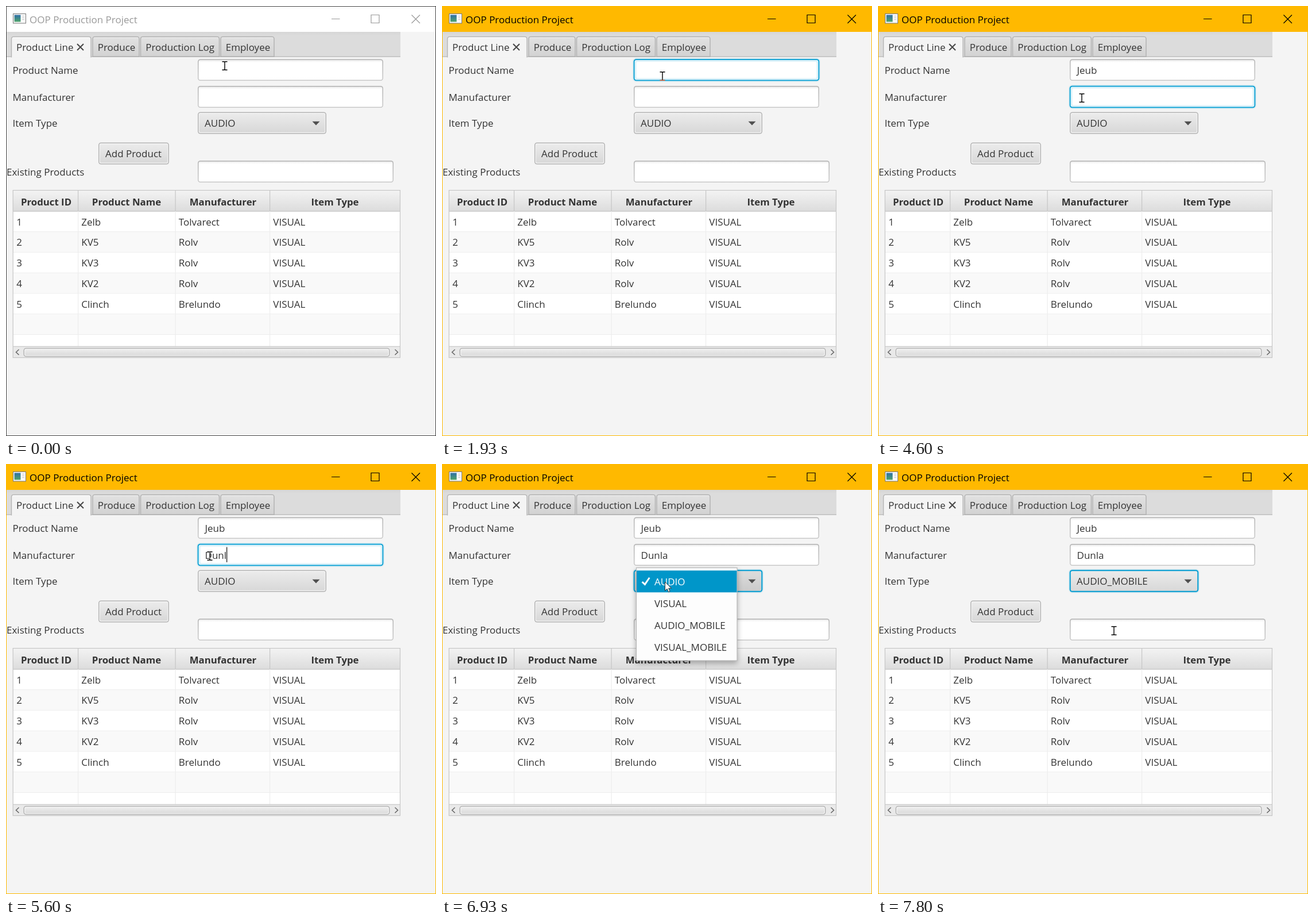
These frames come from a looping animation (749x748 px, 8000 ms). An HTML page:

```html
<!DOCTYPE html>
<html lang="en">
<head>
<meta charset="utf-8">
<title>OOP Production Project</title>
<style>
html, body { margin: 0; width: 100%; height: 100%; overflow: hidden; background: #f4f4f4; }
svg { display: block; width: 100%; height: 100%; }
text { font: 17px "Open Sans", "Noto Sans", sans-serif; fill: #333; white-space: pre; }
.head { font-weight: 700; font-size: 16.8px; text-anchor: middle; }
#beam { mix-blend-mode: difference; }
#popup { filter: drop-shadow(0 4px 5px rgba(0, 0, 0, .3)); }
</style>
</head>
<body>
<svg id="stage" viewBox="0 0 749 748"></svg>
<script>
const LOOP = 8000;
const stage = document.getElementById('stage');
const $ = id => document.getElementById(id);

// Markup helpers
const attrs = o => Object.entries(o).map(([k, v]) => ` ${k}="${v}"`).join('');
const rect = (x, y, w, h, fill, o = {}) =>
  `<rect x="${x}" y="${y}" width="${w}" height="${h}" fill="${fill}"${attrs(o)}/>`;
const path = (d, o) => `<path d="${d}"${attrs({ fill: 'none', ...o })}/>`;
const text = (x, y, s, o = {}) => `<text x="${x}" y="${y}"${attrs(o)}>${s}</text>`;
const group = (id, body) => `<g id="${id}">${body}</g>`;
const grad = (id, ...stops) =>
  `<linearGradient id="${id}" x2="0" y2="1">${stops.map(([at, c]) =>
    `<stop offset="${at}" stop-color="${c}"/>`).join('')}</linearGradient>`;

// A control is a stack of inset rounded rects, as [inset, fill]
const layers = (x, y, w, h, list) => list.map(([i, fill]) =>
  rect(x + i, y + i, w - 2 * i, h - 2 * i, fill, { rx: Math.max(2, 4.5 - i) })).join('');
const FOCUS = '#039ed3', FAINT = '#039ed322';
const plainField = box => layers(...box, [[0, 'url(#edge)'], [1.5, 'url(#inset)']]);
const focusField = box => layers(...box,
  [[-2, FAINT], [-0.3, FOCUS], [1.5, '#fff'], [1.5, FAINT], [4.5, '#fff']]);
const button = (box, fill = 'url(#btn)') => layers(...box, [[0, '#b4b4b4'], [1.5, '#f6f6f6'], [2.7, fill]]);

const NAME = [334, 92.5, 323, 37.5];
const MAKER = [334, 139, 323, 38];
const SEARCH = [334, 269, 341, 38];
const COMBO = [334, 184.5, 224, 38];
const TYPES = ['AUDIO', 'VISUAL', 'AUDIO_MOBILE', 'VISUAL_MOBILE'];
const ITEM_TOP = 185.3, ITEM_H = 38;

function titleBar() {
  return rect(0.5, 0.5, 748, 747, 'none', { id: 'frame' }) + rect(1, 1, 747, 44, '#fff', { id: 'bar' }) +
    rect(12.5, 13.5, 22, 16.5, '#fbfbfb', { stroke: '#777' }) +
    rect(14.5, 15.5, 11, 12, 'url(#icon)') +
    path('M28 17.5h4M28 20.5h4M28 23.5h4', { stroke: '#c4c4c4' }) +
    text(41, 29.7, 'OOP Production Project', { id: 'title' }) +
    path('M567 22.5h14.5M636 15.5h14v14h-14zM706.5 15.5l14.5 14.5M721 15.5l-14.5 14.5',
      { id: 'winBtns', 'stroke-width': 1.2 });
}

function tabs() {
  const tab = (x, w, label) =>
    path(`M${x} 88V57.5q0 -4 4 -4h${w - 8}q4 0 4 4V88z`, { fill: 'url(#tab)', stroke: '#b0b0b0', 'stroke-width': 1.4 }) +
    path(`M${x + 1.5} 55.2h${w - 3}`, { stroke: '#efefef' }) + text(x + 8.7, 77.8, label);
  return rect(1, 45, 686, 43.5, 'url(#tabBar)') + rect(1, 87.5, 686, 1.2, '#b8b8b8') +
    tab(151, 81, 'Produce') + tab(234.5, 137, 'Production Log') + tab(374, 93, 'Employee') +
    path('M9.5 89.5V57.5q0 -4 4 -4h130.500q4 0 4 4V89.500', { fill: '#f4f4f4', stroke: '#b5b5b5', 'stroke-width': 1.4 }) +
    path('M11.500 55.200h134.500', { stroke: '#fff' }) +
    text(18, 77.8, 'Product Line') +
    path('M124 66l11 11M135 66l-11 11', { stroke: '#484848', 'stroke-width': 2.1 });
}

function form() {
  const [cx, cy, cw, ch] = COMBO;
  return text(11.5, 117.5, 'Product Name') + text(11.5, 164.500, 'Manufacturer') +
    text(11.5, 210.3, 'Item Type') + text(1, 294.8, 'Existing Products') +
    [NAME, MAKER, SEARCH].map(plainField).join('') +
    group('nameFocus', focusField(NAME)) + group('makerFocus', focusField(MAKER)) +
    text(346.5, 117.5, '', { id: 'name' }) + text(346.5, 164.5, '', { id: 'maker' }) +
    rect(346.3, 98.3, 1.5, 26.4, '#333', { id: 'caret' }) +
    button(COMBO) +
    group('comboFocus', layers(cx, cy, cw, ch, [[-2, FAINT], [-0.3, FOCUS], [1.7, 'url(#btn)']])) +
    rect(cx + 2, cy + 2, cw - 4, ch - 4, '#00000010', { id: 'comboArmed', rx: 3 }) +
    path('M533.500 200.700h13l-6.500 6.800z', { fill: '#505050' }) +
    text(346, 210.3, '', { id: 'choice' }) +
    button([161, 237.5, 123, 38]) + text(173, 263, 'Add Product');
}

function table() {
  const cols = [12, 125, 294.5, 459];
  const heads = [['Product ID', 70], ['Product Name', 210], ['Manufacturer', 378], ['Item Type', 573]];
  const data = [
    ['Zelb', 'Tolvarect'], ['KV5', 'Rolv'], ['KV3', 'Rolv'], ['KV2', 'Rolv'], ['Clinch', 'Brelundo']
  ];
  let s = rect(12, 320.5, 675, 291.5, '#fff');
  for (let i = 0; i < 7; i++) {
    const y = 357.3 + i * 35.8, h = Math.min(35.8, 592 - y);
    s += rect(12, y, 675, h, i % 2 ? '#f9f9f9' : '#fff');
    if (i < 6) s += rect(12, y + h - 1, 675, 1.2, '#ededed');
  }
  s += rect(12, 321, 675, 36, 'url(#head)') + rect(12, 356.5, 675, 1.2, '#c4c4c4');
  for (const x of cols.slice(1))
    s += rect(x, 357, 1.2, 235, '#ededed') + rect(x, 321, 1.2, 36, '#c6c6c6');
  s += heads.map(([h, x]) => text(x, 346.5, h, { class: 'head' })).join('');
  data.forEach((row, i) => [i + 1, ...row, 'VISUAL'].forEach((v, c) => {
    s += text(cols[c] + 6.3, 381.5 + i * 35.9, v);
  }));
  return s + rect(12, 592, 675, 20, '#e9e9e9') + rect(12, 591.700, 675, 1.200, '#c8c8c8') +
    button([30.5, 594.8, 638, 15.5], 'url(#thumb)') +
    path('M22.500 597.500l-5 4.700 5 4.700M677.500 597.500l5 4.700 -5 4.700', { stroke: '#6a6a6a', 'stroke-width': 1.5 }) +
    rect(12.2, 320.6, 674.3, 291, 'none', { stroke: '#c6c6c6', 'stroke-width': 1.2 });
}

function popup() {
  return group('popup', rect(338.5, 180.5, 175.5, 161.5, '#fdfdfd', { stroke: '#b8b8b8', 'stroke-width': 1.2 }) +
    rect(339, 0, 174.5, ITEM_H, '#0096c9', { id: 'hover' }) +
    path('M347.500 206l2.300 -2 3.200 3.300 7.200 -10.300 2.300 1.500 -8.800 13.300z', { id: 'check' }) +
    TYPES.map((s, i) => text(370, 210.900 + i * ITEM_H, s, { id: 'type' + i })).join(''));
}

stage.innerHTML =
  '<defs>' +
  grad('edge', [0, '#b2b2b2'], [1, '#c8c8c8']) +
  grad('inset', [0, '#ececec'], [.12, '#fff']) +
  grad('btn', [0, '#ebebeb'], [1, '#d8d8d8']) +
  grad('tabBar', [0, '#d6d6d6'], [.15, '#dcdcdc'], [1, '#dcdcdc']) +
  grad('tab', [0, '#e2e2e2'], [1, '#d2d2d2']) +
  grad('head', [0, '#f3f3f3'], [1, '#dcdcdc']) +
  grad('thumb', [0, '#ededed'], [1, '#dadada']) +
  grad('icon', [0, '#2f6fa8'], [1, '#4fa36b']) +
  '</defs>' +
  rect(0, 0, 749, 748, '#f4f4f4') + titleBar() + tabs() + form() + table() + popup() +
  path('M-4.500 -7.300h3.500l1 1 1 -1h3.500M0 -6.500v13M-4.500 7.300h3.500l1 -1 1 1h3.500',
    { id: 'beam', stroke: '#fff', 'stroke-width': 1.4 }) +
  path('M.5 .5v15.500l3.600 -3.400 2.400 5.500 2.500 -1.100 -2.400 -5.300h4.900z',
    { id: 'arrow', fill: '#fff', stroke: '#333' });

// Timeline
const POINTER = [
  [0, 381, 104], [130, 384, 122], [3800, 384, 122], [4070, 362, 150], [4330, 355, 160],
  [6200, 355, 160], [6600, 388, 204.5], [7270, 388, 204.5], [7400, 404, 261], [7670, 411, 290]
];
const BLINKS = [400, 930, 1400, 1930, 2270, 3870, 4130, 4600, 4670, 6270];
const NAME_KEYS = [2600, 2930, 3130, 3330];
const MAKER_KEYS = [5000, 5330, 5400, 5600, 5800];

const passed = (times, t) => times.filter(at => t >= at).length;
// The screen refreshes 15 times a second, on 10 ms stamps
const tick = t => Math.round(Math.floor((t + 4) * 0.015) * 100 / 15) * 10;
const mix = (a, b, k) => `rgb(${a.map((v, i) => Math.round(v + (b[i] - v) * k))})`;
const show = (id, on) => $(id).setAttribute('display', on ? 'inline' : 'none');
const set = (id, o) => { for (const k in o) $(id).setAttribute(k, o[k]); };

function pointerAt(t) {
  const i = POINTER.findIndex(p => p[0] > t);
  if (i < 0) return POINTER[POINTER.length - 1].slice(1);
  const [t0, x0, y0] = POINTER[i - 1], [t1, x1, y1] = POINTER[i];
  const k = (t - t0) / (t1 - t0);
  return [x0 + (x1 - x0) * k, y0 + (y1 - y0) * k];
}

function render(ms) {
  const t = tick(ms);

  const active = Math.min(1, Math.max(0, (t - 200) / 200));
  const amber = [255, 185, 0];
  const ink = mix([153, 153, 153], [0, 0, 0], active);
  set('bar', { fill: mix([255, 255, 255], amber, active) });
  set('frame', { stroke: mix([68, 68, 68], amber, active) });
  set('winBtns', { stroke: ink });
  $('title').style.fill = ink;

  const inMaker = t >= 4130;
  const onCombo = t >= 6730;
  const open = t >= 6930 && t < 7800;
  show('nameFocus', t >= 400 && !inMaker);
  show('makerFocus', inMaker && !onCombo);
  show('comboFocus', onCombo);
  show('comboArmed', open);

  $('name').textContent = 'Jeub'.slice(0, passed(NAME_KEYS, t));
  $('maker').textContent = 'Dunla'.slice(0, passed(MAKER_KEYS, t));
  const typed = $(inMaker ? 'maker' : 'name');
  set('caret', {
    x: 346.3 + (typed.textContent ? typed.getComputedTextLength() : 0),
    y: inMaker ? 144.5 : 98.3
  });
  show('caret', passed(BLINKS, t) % 2);
  $('choice').textContent = TYPES[t >= 7800 ? 2 : 0];

  const [x, y] = pointerAt(t);
  const hover = Math.floor((y - ITEM_TOP) / ITEM_H);
  show('popup', open);
  if (open) {
    set('hover', { y: ITEM_TOP + hover * ITEM_H });
    set('check', { fill: hover ? '#333' : '#fff' });
    TYPES.forEach((_, i) => { $('type' + i).style.fill = i === hover ? '#fff' : '#333'; });
  }

  const overText = !open && [NAME, MAKER, SEARCH].some(b => y >= b[1] && y <= b[1] + b[3]);
  show('beam', overText);
  show('arrow', !overText);
  set('beam', { transform: `translate(${x} ${y})` });
  set('arrow', { transform: `translate(${x} ${y})` });
}

const start = performance.now();
function loop() {
  render((performance.now() - start) % LOOP);
  requestAnimationFrame(loop);
}
loop();
</script>
</body>
</html>
```
